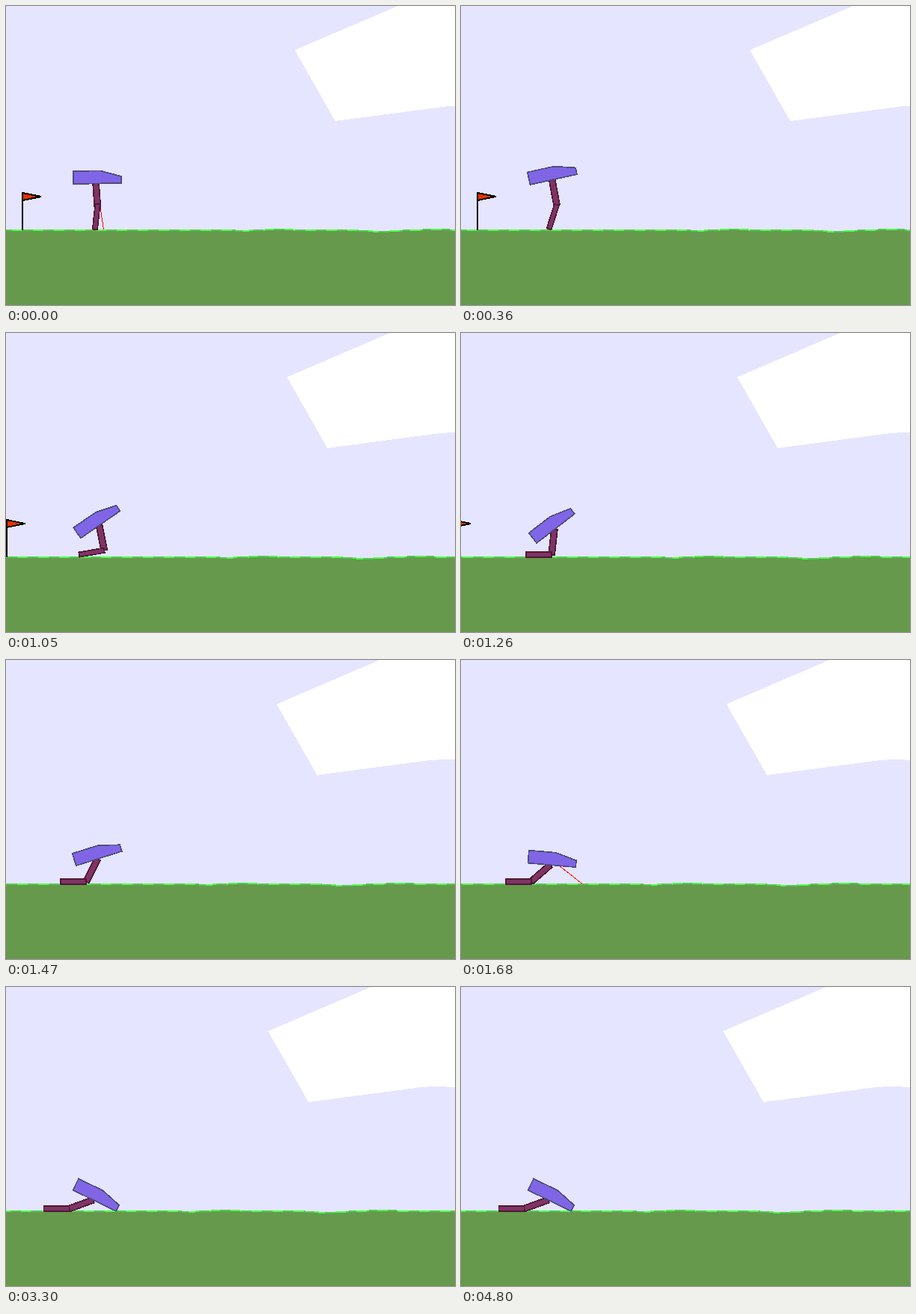
An HTML page that plays this animation: 600x400 px, repeating every 5.25 s.

```html
<!DOCTYPE html>
<html>
<head>
<meta charset="utf-8">
<title>Walker fall</title>
<style>
html, body { margin: 0; width: 100%; height: 100%; overflow: hidden; }
svg { display: block; background: rgb(229,229,255); shape-rendering: crispEdges; }
.leg { fill: rgb(128,51,102); stroke: rgb(77,26,51); stroke-width: 1.7; }
</style>
</head>
<body>
<svg width="600" height="400">
  <polygon id="cloud" fill="#fff" points="386,59 440,154 591,134 609,133 640,134 640,-50"/>
  <polygon id="land" fill="rgb(102,153,76)"/>
  <line id="ray" stroke="red"/>
  <g id="grass" stroke-width="2"></g>
  <rect id="thigh" class="leg" x="-4" width="8" height="34"/>
  <rect id="shin" class="leg" x="-3.2" y="-34" width="6.4" height="34"/>
  <polygon id="hull" fill="rgb(128,102,230)" stroke="rgb(77,77,128)" stroke-width="1.7"
    points="-30,-9 6,-9 34,-1 34,8 -30,8"/>
  <g id="flag" stroke="#000" stroke-width="2">
    <path d="M22 300V250"/>
    <path d="M22 250V260L47 255Z" fill="rgb(230,51,0)"/>
  </g>
</svg>
<script>
const STEP = 30, FRAMES = 175, LEG = 34, HIP = 8, HULL_X = 120, GROUND = 300, TILE = 14;
const $ = id => document.getElementById(id);
const sin = deg => Math.sin(deg * Math.PI / 180);
const cos = deg => Math.cos(deg * Math.PI / 180);

function set(id, attrs) {
  for (const name in attrs) $(id).setAttribute(name, attrs[name]);
}

// positive angles turn counter-clockwise
function place(id, x, y = 0, angle = 0) {
  set(id, { transform: `translate(${x} ${y}) rotate(${-angle})` });
}

// flat ground with four gentle swells: centre, drop, width
const swells = [[316, 1, 12], [365, -1.5, 18], [500, 1.9, 25], [575, -1.6, 16]];
const height = x => swells.reduce(
  (y, [mid, drop, width]) => y + drop * Math.exp(-(((x - mid) / width) ** 2)), GROUND);

function buildGround() {
  let outline = '-6,400', blades = '';
  for (let x = -6, i = 0; x < 700; x += TILE, i++) {
    const next = x + TILE;
    outline += ` ${x},${height(x)}`;
    blades += `<line x1="${x}" y1="${height(x)}" x2="${next}" y2="${height(next)}"
      stroke="rgb(76,${i % 2 ? 255 : 204},76)"/>`;
  }
  set('land', { points: outline + ' 694,400' });
  $('grass').innerHTML = blades;
}

// the sensor ray sweeps out and back in ten steps, every fifty frames
function drawRay(n, y) {
  const k = n % 50;
  const angle = 0.15 * (k < 5 ? 2 * k + 1 : 18 - 2 * k);
  const reach = Math.min(160, (GROUND - y) / Math.cos(angle));
  set('ray', {
    visibility: k < 10 ? 'visible' : 'hidden',
    x1: HULL_X, y1: y,
    x2: HULL_X + reach * Math.sin(angle), y2: y + reach * Math.cos(angle)
  });
}

function draw(n) {
  const s = Math.min(n * STEP / 1000, 1.86);

  // the knee folds to its stop, the shin lands, then the hip stop drags the hull over
  const u = s - 0.81;
  const thigh = Math.min(4 + 50 * s * s, 29 - 66.9 * u - 26.1 * u * u);
  const shin = Math.max(-6 - 90 * s * s, thigh - 91.5, -90);
  const tilt = Math.min(1 + 32 * s, thigh + 44);

  // the toe corner stays on the ground, with one short slip backwards
  const slip = 3.4 * sin(180 * Math.min(s / 1.6, 1)) ** 2;
  const footX = 122.15 - 3.2 * cos(shin) - slip;
  const footY = 299.2 + 2.7 * sin(shin);

  const overlap = 6.3 * Math.max(0, 1 - n / 4);
  const ahead = -LEG * (sin(shin) + sin(thigh)) - HIP * sin(tilt);
  const hullY = footY - LEG * (cos(shin) + cos(thigh)) - HIP * cos(tilt) + overlap;
  const scroll = footX - HULL_X + ahead;

  place('cloud', -scroll / 2);
  for (const id of ['land', 'grass', 'flag']) place(id, -scroll);
  drawRay(n, hullY);
  place('thigh', HULL_X + HIP * sin(tilt), hullY + HIP * cos(tilt), thigh);
  place('shin', HULL_X - ahead, footY, shin);
  place('hull', HULL_X, hullY, tilt);
}

buildGround();
const start = performance.now();
function tick() {
  draw(Math.floor((performance.now() - start) / STEP) % FRAMES);
  requestAnimationFrame(tick);
}
tick();
</script>
</body>
</html>
```
